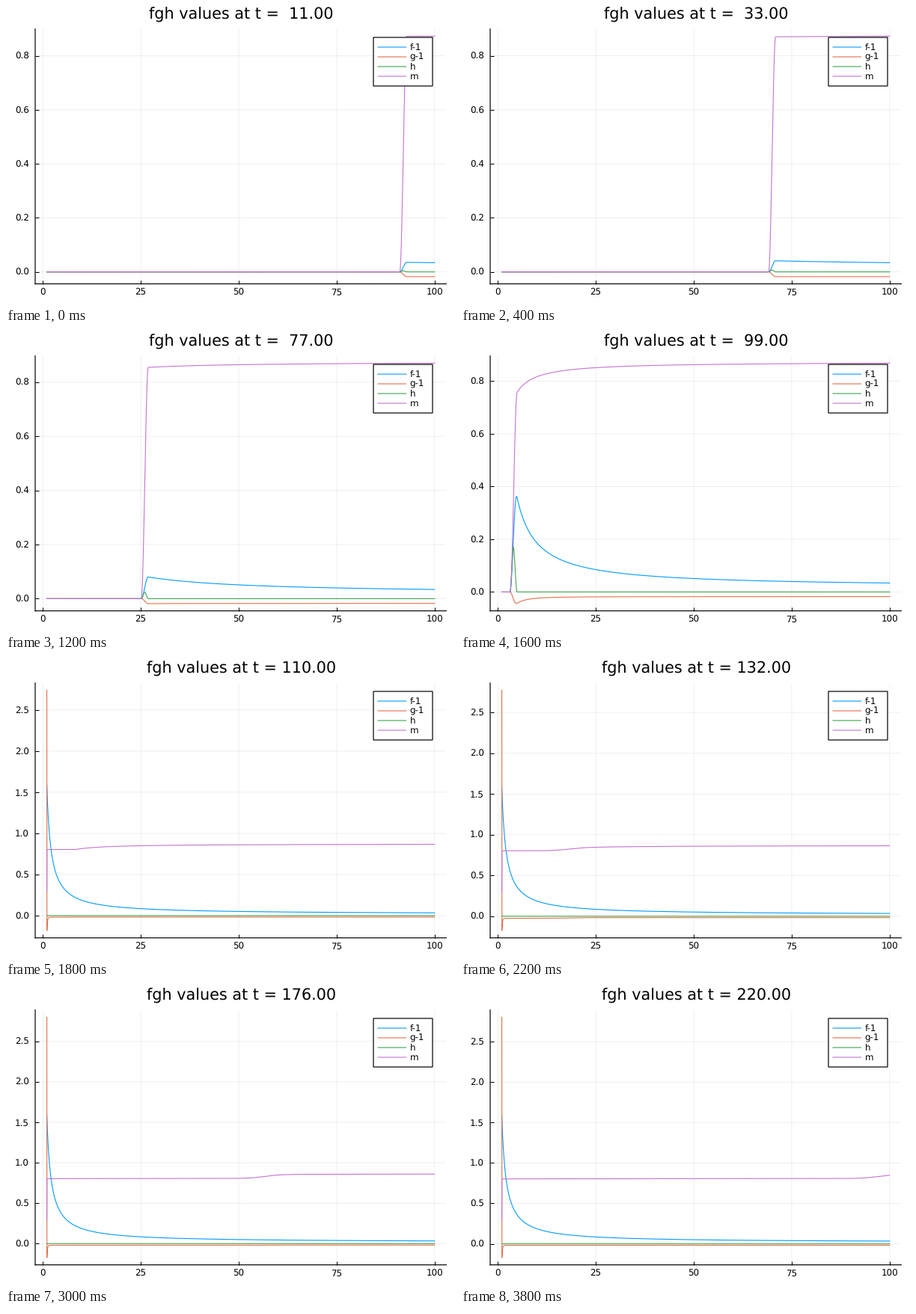
A matplotlib script that plays this animation: 600x400 px, repeating every 4 s.

```python
import numpy as np
import matplotlib.pyplot as plt
from matplotlib.animation import FuncAnimation
from matplotlib.patches import Rectangle

W, H, DPI = 600, 400, 100
PX = 72 / DPI
FRAMES, INTERVAL, DT = 20, 200, 11
LABEL_SIZE, TITLE_SIZE = 11.9 * PX, 20.8 * PX
CURVE, FRAME = 1.1 * PX, 1.2 * PX
SERIES = [("f-1", "#009afa"), ("g-1", "#e36f47"),
          ("h", "#3ea44e"), ("m", "#c371d2")]

plt.rcParams.update({"font.family": "DejaVu Sans", "path.snap": False,
                     "text.hinting": "none"})
x = np.append(np.linspace(1, 1.3, 16), np.linspace(1.32, 100, 2400))
f_tail = 0.017 + 1.7 / (x + 0.08)


def mass_outside(t):
    end = 0.873 - 5e-7 * t**2 if t < 100 else 0.868 - 0.00011 * (t - 99)
    return end - 0.57 * (1 / x - 0.01)


def infalling(t):
    """Pulse moving inward, with its front at 103 - t."""
    u = np.clip((x - (103 - t)) / 0.9, -1, 1)
    ramp = (1 + np.sin(np.pi * u / 2)) / 2
    g = -ramp * (0.0175 + 0.62 / x**2)
    h = (0.68 / x - 0.003) * np.cos(np.pi * u / 2) ** 2
    return ramp * f_tail, g, h, ramp * mass_outside(t)


def collapsed(t):
    """Steep core at the inner edge and a faint pulse moving outward."""
    age = t - 132
    center = 17.5 + 0.875 * age + 0.0003 * age**2
    passed = (1 + np.tanh((x - center) / 4)) / 2

    g = -0.0175 - 0.0085 * np.exp(-age / 35) * (1 - passed)
    low = -0.17 - 0.007 * np.exp(-age / 40)
    g += (low - g) * np.exp(-np.maximum(x - 1.04, 0) / 0.12)
    g[0] = 2.805 - 0.031 * np.exp(-age / 30)

    inner = 0.803 + 0.00005 * x
    m = inner + passed * np.maximum(mass_outside(t) - inner, 0)
    m[0] = 0.3
    return f_tail, g, np.zeros_like(x), m


fig = plt.figure(figsize=(W / DPI, H / DPI), dpi=DPI, facecolor="white")
ax = fig.add_axes([39 / W, 28.3 / H, 549.3 / W, 341 / H])
ax.set_xlim(-1.97, 102.97)
ax.set_xticks([0, 25, 50, 75, 100])
ax.spines[["top", "right"]].set_visible(False)
for side in ("left", "bottom"):
    ax.spines[side].set_linewidth(FRAME)
ax.set_axisbelow(True)
ax.grid(color="black", alpha=0.08, linewidth=0.8 * PX)
ax.tick_params(direction="in", length=5 * PX, width=PX, labelsize=LABEL_SIZE)
ax.tick_params(axis="x", pad=5.8 * PX)
ax.tick_params(axis="y", pad=8 * PX)
lines = [ax.plot([], [], color=color, linewidth=CURVE)[0]
         for _, color in SERIES]

# Overlay measured in pixels from the top left
over = fig.add_axes([0, 0, 1, 1])
over.set(xlim=(0, W), ylim=(H, 0))
over.axis("off")
title = over.text(314.3, 18, "", size=TITLE_SIZE, ha="center", va="baseline")
over.add_patch(Rectangle((491, 42), 79, 65, facecolor="white",
                         edgecolor="black", linewidth=FRAME))
for i, (name, color) in enumerate(SERIES):
    y = 55 + 13 * i
    over.plot([497, 534.5], [y, y], color=color, linewidth=CURVE)
    over.text(539.5, y + 4, name, size=LABEL_SIZE, va="baseline")


def update(i):
    t = DT * (i + 1)
    curves = infalling(t) if t < 103 else collapsed(t)
    for line, values in zip(lines, curves):
        line.set_data(x, values)
    low, high = np.min(curves), np.max(curves)
    pad = 0.03 * (high - low)
    ticks = np.arange(0, high, 0.5 if high > 1 else 0.2)
    ax.set_yticks(ticks, [f"{v:.1f}" for v in ticks])
    ax.set_ylim(low - pad, high + pad)
    title.set_text(f"fgh values at t = {t:6.2f}")
    return [*lines, title]


anim = FuncAnimation(fig, update, frames=FRAMES, interval=INTERVAL,
                     repeat=True, repeat_delay=0, blit=False)
plt.show()
```
